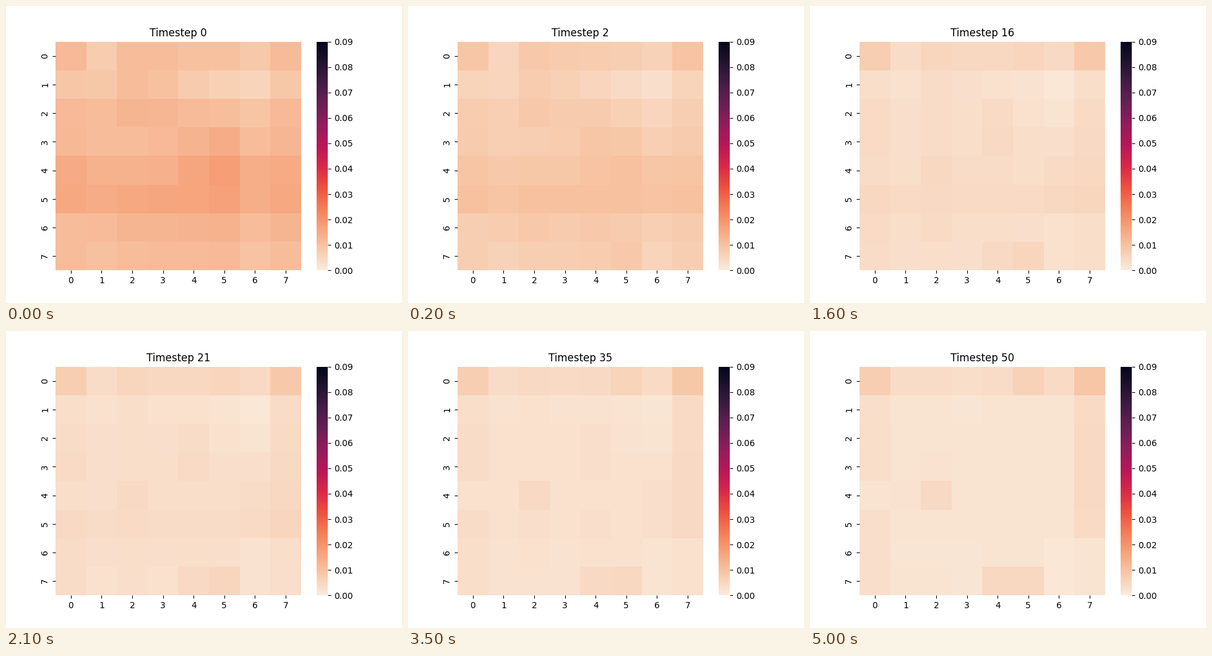
Animation of 640 by 480 pixels, one loop 5100 ms. Source, as a matplotlib script:

```python
import numpy as np
import matplotlib.pyplot as plt
from matplotlib.animation import FuncAnimation
from matplotlib.colors import LinearSegmentedColormap

STEPS = 51
SIZE = 8
VMAX = 0.09
DECAY = 2.5  # timesteps for the first fast drop

# Light to dark, evenly spaced
HEAT = LinearSegmentedColormap.from_list("heat", [
    "#faebdd", "#f7c9aa", "#f6a47c", "#f47d57", "#ed503e", "#d92847",
    "#b91657", "#921c5b", "#691f55", "#451c47", "#221331", "#03051a"])


def field(rows, cols, spots):
    """Row profile plus column profile plus soft spots, in units of 1e-4."""
    grid = np.add.outer(rows, cols).astype(float)
    y, x = np.indices(grid.shape)
    for row, col, height, width in spots:
        dist2 = (y - row) ** 2 + (x - col) ** 2
        grid += height * np.exp(-dist2 / (2 * width ** 2))
    return grid * 1e-4


start = field(
    [101, 86, 116, 122, 148, 157, 126, 110],
    [1, -10, 1, 4, 6, 9, -15, 1],
    [(1, 2, 24, 0.8), (1.2, 5, -30, 0.8), (3.6, 5, 26, 0.7),
     (3.6, 2.4, -20, 0.7), (0, 0, 16, 0.4), (0, 1, -22, 0.4),
     (0, 7, 14, 0.4), (6, 0, -18, 0.4)])

settled = field(
    [53, 31, 38, 41, 45, 53, 41, 37],
    [4, -4, 3, 1, 2, -4, -5, 3],
    [(0, 0, 12, 0.4), (0, 1, -18, 0.4), (0, 7, 22, 0.4),
     (1, 2, 14, 0.8), (1.4, 6, -22, 0.6), (2.5, 4, 24, 0.5),
     (4.5, 6, 26, 0.5), (7, 5, 22, 0.4), (6, 1.5, 13, 0.6)])

final = field(
    [35, 16, 19, 19, 19, 18, 15, 16],
    [14, 2, 2, 0, 2, 2, 2, 24],
    [(0, 0, 24, 0.4), (0, 5, 25, 0.4), (0, 7, 32, 0.4),
     (4, 2, 22, 0.4), (7, 4.5, 48, 0.5), (6.5, 7, -28, 0.6),
     (4, 0, -14, 0.4)])


def levels_at(step):
    """Fast exponential drop on top of a slow drift to the end state."""
    drift = (step / (STEPS - 1)) ** 0.8
    slow = settled + (final - settled) * drift
    levels = slow + (start - settled) * np.exp(-step / DECAY)
    return np.clip(levels, 0, VMAX)


fig, ax = plt.subplots(figsize=(6.4, 4.8), dpi=100)
mesh = ax.pcolormesh(levels_at(0), cmap=HEAT, vmin=0, vmax=VMAX)
ax.set(xlim=(0, SIZE), ylim=(SIZE, 0))
ax.spines[:].set_visible(False)
centers = np.arange(SIZE) + 0.5
ax.set_xticks(centers, range(SIZE))
ax.set_yticks(centers, range(SIZE), rotation="vertical", va="center")

bar = fig.colorbar(mesh, ax=ax, ticks=np.arange(10) / 100, format="%.2f")
bar.outline.set_linewidth(0)
title = ax.set_title("Timestep 0")


def draw(step):
    mesh.set_array(levels_at(step))
    title.set_text(f"Timestep {step}")
    return mesh, title


anim = FuncAnimation(fig, draw, frames=STEPS, interval=100,
                     repeat=True, repeat_delay=0)
plt.show()
```
